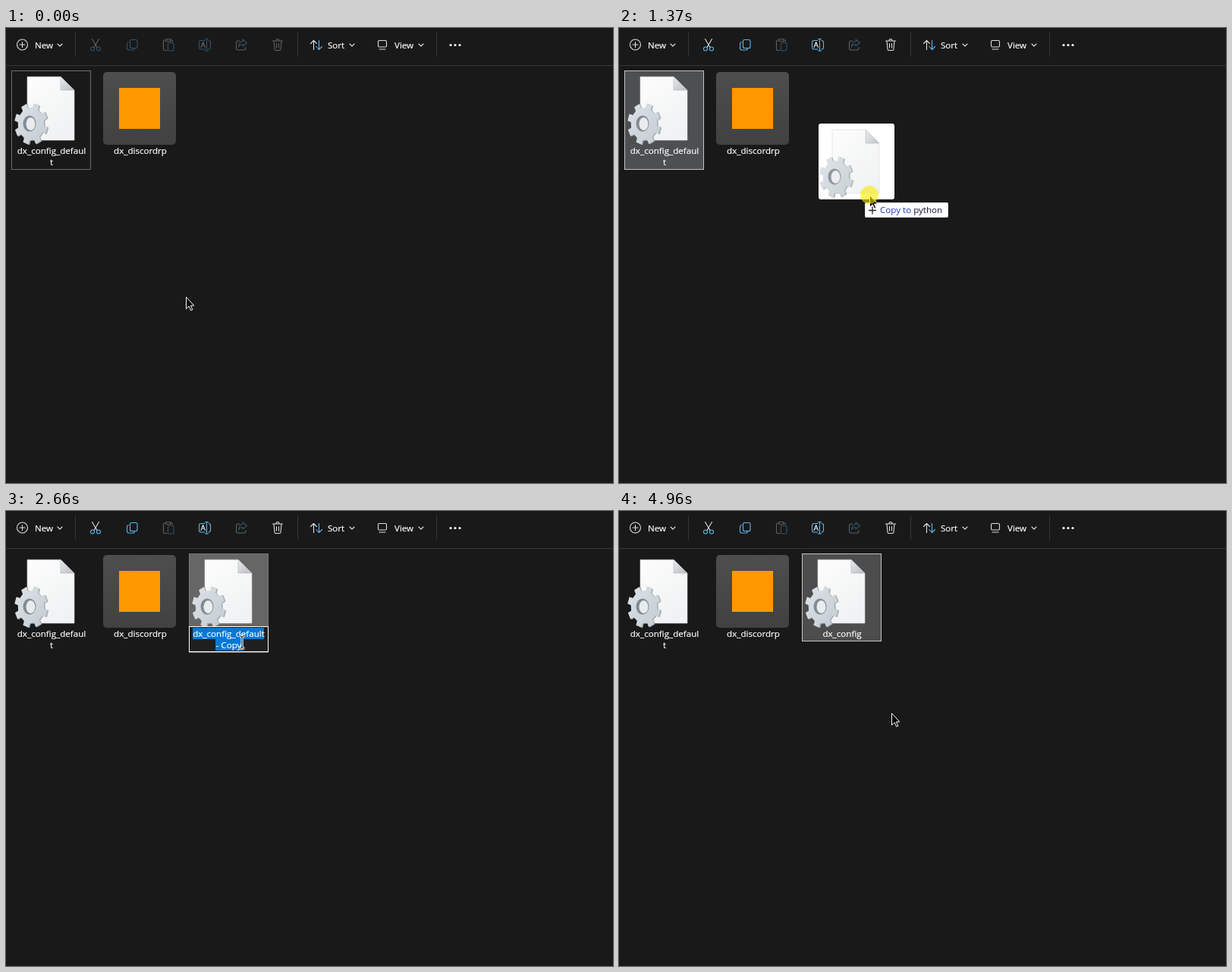
Write an HTML page that moves like this. It is 800 px wide and 600 px high and loops after 7.54 s.

```html
<!DOCTYPE html>
<html lang="en">
<head>
<meta charset="utf-8">
<title>Copy and rename</title>
<style>
  html, body { margin: 0; width: 100%; height: 100%; overflow: hidden; background: #191919; }
  svg { display: block; }
  text { font: 11.6px "Open Sans", "Noto Sans", sans-serif; fill: #fff; stroke: #fff; stroke-width: .2; }
  .mid { text-anchor: middle; }
  .w, .b { fill: none; stroke-width: 1.1; stroke-linecap: round; stroke-linejoin: round; }
  .w { stroke: #dedede; }
  .b { stroke: #5ab8f0; }
  .off { opacity: .36; }
</style>
</head>
<body>
<svg width="800" height="600" viewBox="0 0 800 600">
  <defs>
    <linearGradient id="paper" x2=".6" y2="1"><stop stop-color="#fdfdfd"/><stop offset="1" stop-color="#f0f2f3"/></linearGradient>
    <linearGradient id="fold" x2="1" y2="1"><stop stop-color="#e9ebec"/><stop offset="1" stop-color="#b9bdc0"/></linearGradient>
    <linearGradient id="metal" x2="1" y2="1"><stop stop-color="#dde3e8"/><stop offset="1" stop-color="#c3cbd1"/></linearGradient>
    <linearGradient id="tile" x2="0" y2="1"><stop stop-color="#4e4e4e"/><stop offset="1" stop-color="#414141"/></linearGradient>
    <g id="file">
      <path d="M28 64.200H72L90 82V148H28Z" fill="url(#paper)" stroke="#d3d6d8" stroke-width=".6"/>
      <path d="M72 64V82H90Z" fill="url(#fold)" stroke="#a9adb0" stroke-width=".5"/>
      <path id="gearSide" fill="#a3acb2"/>
      <path id="gearFace" fill="url(#metal)"/>
      <ellipse cx="31" cy="126" rx="8.5" ry="10.5" fill="#828b91"/>
      <ellipse cx="32.5" cy="126.5" rx="6" ry="8.500" fill="#e9ecee"/>
    </g>
    <path id="chevron" class="w" d="M-3 -1.5L0 1.5L3 -1.5"/>
  </defs>
  <rect width="800" height="600" fill="#191919"/>

  <g id="toolbar">
    <path d="M0 49.5H800M91.5 6V38M384.5 6V38M567.5 6V38" stroke="#363636"/>
    <circle class="w" cx="21.5" cy="22" r="7"/><path class="w" d="M18 22H25M21.5 18.5V25.5"/>
    <text x="38" y="27">New</text><use href="#chevron" x="71" y="22.5"/>
    <g class="tool">
      <path class="w" d="M113.5 14.5L120 25.5M122.5 14.5L116 25.5"/>
      <circle class="b" cx="114" cy="27.5" r="2.5"/><circle class="b" cx="122" cy="27.5" r="2.5"/>
    </g>
    <g class="tool">
      <rect class="b" x="163.5" y="15.5" width="9.5" height="11" rx="2"/>
      <path class="b" d="M161.5 18.5Q159.5 19 159.5 21V26.5Q159.5 29 162 29H167Q169 29 169.5 27.5"/>
    </g>
    <g class="off">
      <path class="w" d="M211 16H209Q207.5 16 207.5 17.5V28Q207.5 29.5 209 29.5H212M217 16H218.5Q219.5 16 219.5 18M211 14.5H217V17.5H211Z"/>
      <rect class="b" x="213.5" y="19.5" width="7.5" height="10.5" rx="1.5"/>
    </g>
    <g class="tool">
      <path class="b" d="M262 16.5H257Q254.5 16.5 254.5 19V25.5Q254.5 28 257 28H262M267 16.5Q269.5 16.5 269.5 19V25.5Q269.5 28 267 28"/>
      <path class="w" d="M257 25.5L259.7 18.5L262.4 25.5M258 23H261.5"/>
      <path class="b" d="M262.5 14.5H266.5M262.5 30H266.5M264.5 14.5V30"/>
    </g>
    <g class="off">
      <path class="w" d="M308 17H306Q303.5 17 303.5 19.5V26.5Q303.5 29 306 29H313.5Q316 29 316 26.5V25.5"/>
      <path class="b" d="M312 15L317.5 19.5L312 24V21.5Q308 21.5 306.5 25Q307 18 312 17.5Z"/>
    </g>
    <g class="tool">
      <path class="w" d="M351.5 17H364.5M356 17Q356 14.5 358 14.5T360 17M353 17L354 28Q354.2 29.5 355.5 29.5H360.5Q361.8 29.5 362 28L363 17M356.5 20.5V26M359.5 20.5V26"/>
    </g>
    <path class="w" d="M405.5 28.5V16.5M401.5 20.5L405.5 16.5L409.5 20.5"/>
    <path class="b" d="M412.5 16.5V28.5M408.8 24.5L412.5 28.5L416.5 24.5"/>
    <text x="424" y="27">Sort</text><use href="#chevron" x="456" y="22.5"/>
    <rect class="w" x="490.5" y="16.5" width="11" height="8.5" rx="1.5"/><path class="w" d="M492 28H500"/>
    <text x="512" y="27">View</text><use href="#chevron" x="547" y="22.5"/>
    <g fill="#fff"><circle cx="586" cy="22.5" r="1.6"/><circle cx="592" cy="22.5" r="1.6"/><circle cx="598" cy="22.5" r="1.6"/></g>
  </g>

  <rect id="firstBox" x="7.5" y="56.5" width="104" height="130"/>
  <use href="#file"/>
  <text class="mid" x="60" y="166">dx_config_defaul</text>
  <text class="mid" x="60" y="181">t</text>

  <rect x="128" y="58" width="96" height="96" rx="5" fill="url(#tile)"/>
  <rect x="149" y="79" width="54" height="54" fill="#ff9800"/>
  <text class="mid" x="177" y="166">dx_discordrp</text>

  <g id="copy">
    <rect id="copyBox" x="241.5" y="56.5" width="104"/>
    <use href="#file" x="234"/>
    <rect id="edit" y="152.5" fill="#1f1f1f" stroke="#fff"/>
    <rect id="mark1" y="154" height="15" fill="#0078d7"/>
    <rect id="mark2" y="169" height="15" fill="#0078d7"/>
    <text class="mid" id="line1" y="166"></text>
    <text class="mid" id="line2" y="181"></text>
  </g>

  <g id="drag">
    <rect x="-67" y="-94" width="100" height="100" rx="3" fill="#fff"/>
    <use href="#file" x="-77" y="-150" opacity=".9"/>
    <rect x="-5.5" y="10.5" width="109" height="19" rx="1" fill="#fff" stroke="#ddd"/>
    <path d="M-1 20.5H9M4 15.5V25.5" stroke="#222" stroke-width="1.3"/>
    <text x="14" y="24" style="fill:#2438b8;stroke:none">Copy to <tspan fill="#14143c">python</tspan></text>
  </g>
  <g id="pointer">
    <path id="arrow" d="M.5 .8V16.3L4.2 12.8L6.700 18.300L8.800 17.400L6.500 12H10.800Z" fill="#000" stroke="#fff"/>
    <g id="beam" fill="none">
      <path d="M-3.5 -8H-1.5L0 -7L1.5 -8H3.5M0 -7V7M-3.5 8H-1.5L0 7L1.5 8H3.5" stroke="#fff" stroke-width="3"/>
      <path d="M-3.5 -8H-1.5L0 -7L1.5 -8H3.5M0 -7V7M-3.5 8H-1.5L0 7L1.5 8H3.5" stroke="#000"/>
    </g>
    <circle id="press" r="12" fill="#faeb00" opacity=".6"/>
  </g>
</svg>
<script>
const LOOP = 7540, TICK = 70;
const $ = id => document.getElementById(id);
const set = (id, attrs) => { for (const k in attrs) $(id).setAttribute(k, attrs[k]); };
const show = (id, on) => { $(id).style.display = on ? '' : 'none'; };
const within = (t, a, b) => t >= a && t < b;

// Pointer path: time, x, y
const path = [
  [0, 237, 354], [230, 237, 354], [470, 120, 215], [610, 50, 163], [680, 47, 160], [960, 47, 160],
  [1230, 214, 220], [1370, 330, 220], [1440, 372, 210], [1580, 372, 200], [1640, 355, 186], [1850, 355, 186],
  [2040, 320, 169], [2250, 297, 136], [2390, 297, 136], [2590, 311, 173], [2800, 311, 173],
  [3190, 315.5, 177], [3260, 315.5, 177], [3540, 298, 163], [3770, 298, 163], [4020, 359, 266]
];
const bursts = [0, 260, 1020, 1640, 1900, 2660, 2860, 3810];
const presses = [[540, 680], [880, 1510], [2250, 2330], [3190, 3540]];

function pointerAt(t) {
  const start = bursts.filter(b => b <= t).pop();
  const s = start + Math.floor((t - start) / TICK) * TICK;
  const i = path.findIndex(p => p[0] > s);
  if (i < 0) return path[path.length - 1].slice(1);
  const a = path[i - 1], b = path[i], k = (s - a[0]) / (b[0] - a[0]);
  return [1, 2].map(n => Math.floor(a[n] + (b[n] - a[n]) * k));
}

function gear(cx, cy) {
  const points = [];
  for (let tooth = 0; tooth < 8; tooth++)
    for (const [turn, r] of [[-.28, .79], [-.22, 1], [.22, 1], [.28, .79]]) {
      const a = (tooth + turn + .42) * Math.PI / 4;
      points.push(`${(cx + 22 * r * Math.cos(a)).toFixed(1)} ${(cy + 27.5 * r * Math.sin(a)).toFixed(1)}`);
    }
  return `M${points.join('L')}Z`;
}

function drawCopy(t, x, y) {
  show('copy', t >= 1770);
  const editing = within(t, 2660, 4290), long = t < 3810;
  const bright = within(t, 2660, 4830);
  set('copyBox', {
    height: t < 4830 ? 130 : 115,
    fill: bright ? '#666' : '#4d4d4d',
    stroke: bright ? '#777' : within(t, 4830, 4960) ? '#4d4d4d' : '#c4c4c4'
  });
  show('edit', editing);
  set('edit', long ? { x: 241.5, width: 104, height: 33 } : { x: 246.5, width: 93, height: 18 });

  $('line1').textContent = !long ? 'dx_config' : editing ? 'dx_config_default' : 'dx_config_defaul';
  $('line2').textContent = !long ? '' : editing ? '- Copy' : 't - Copy';
  for (const id of ['line1', 'line2']) set(id, { x: editing ? 293.5 : 294 });

  const all = within(t, 2660, 3190), dragging = within(t, 3280, 3810);
  const upper = dragging && y < 169;
  const from1 = all ? 246 : x, from2 = all || upper ? 276 : Math.min(x, 313);
  show('mark1', all || upper);
  show('mark2', all || dragging);
  set('mark1', { x: from1, width: 340 - from1 });
  set('mark2', { x: from2, width: 313 - from2 });
}

function render(t) {
  const [x, y] = pointerAt(t);
  const picked = within(t, 600, 1770);
  document.querySelectorAll('.tool').forEach(g => g.classList.toggle('off', t < 600));
  show('firstBox', t < 1770);
  set('firstBox', { fill: picked ? '#4d4f50' : 'none', stroke: picked ? '#c4c4c4' : '#6b6b6b' });
  drawCopy(t, x, y);

  const move = { transform: `translate(${x} ${y})` };
  set('drag', move);
  set('pointer', move);
  show('drag', within(t, 1020, 1510));
  const beam = within(t, 2660, 3810);
  show('beam', beam);
  show('arrow', !beam);
  show('press', presses.some(([a, b]) => within(t, a, b)));
}

set('gearSide', { d: gear(34.5, 127) });
set('gearFace', { d: gear(33, 126.5) });
const began = performance.now();
function frame() {
  render((performance.now() - began) % LOOP);
  requestAnimationFrame(frame);
}
frame();
</script>
</body>
</html>
```
